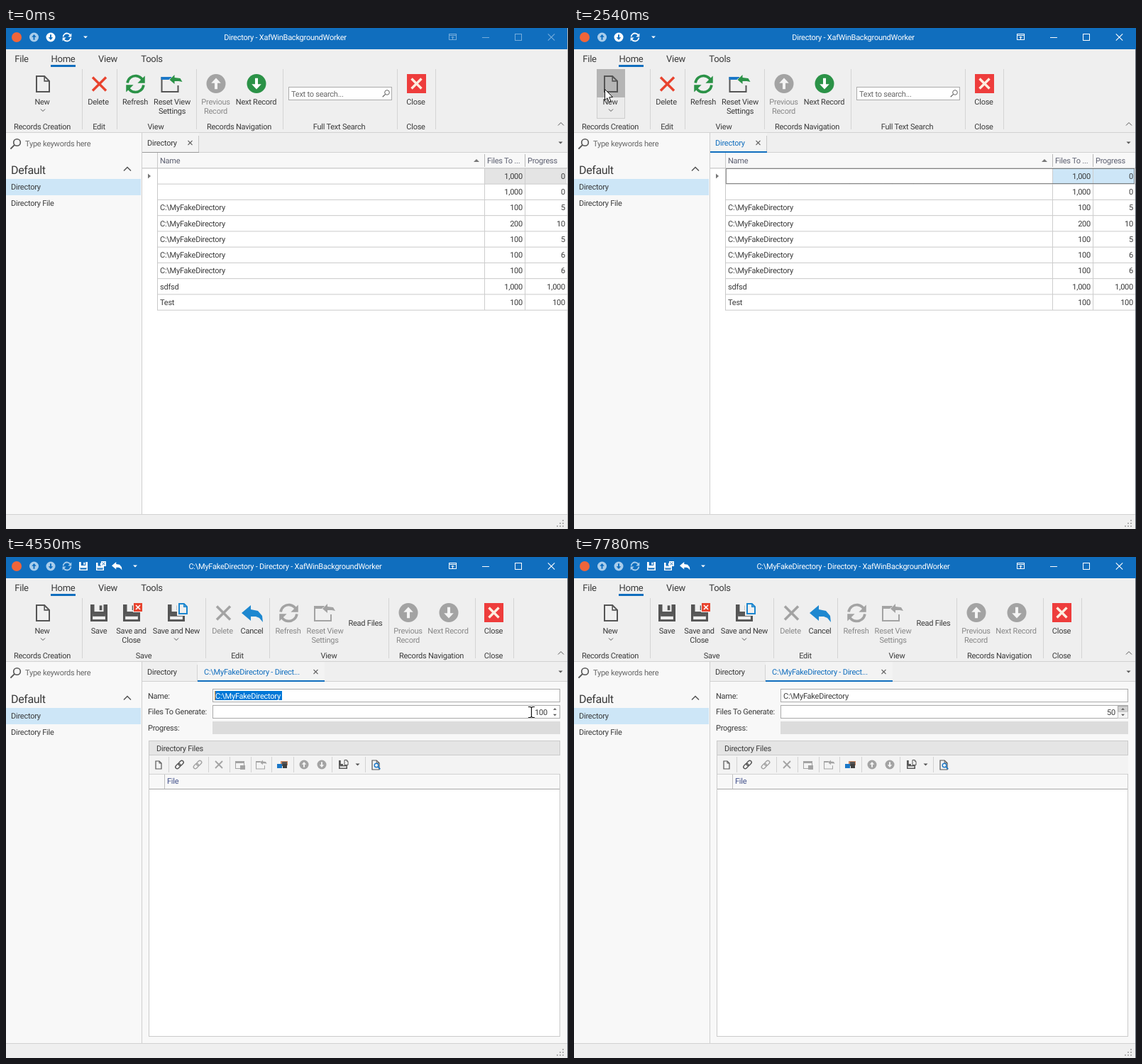
An HTML page with a canvas for the animation above (8000 ms loop, 792 by 707 pixels).

```html
<!DOCTYPE html>
<html lang="en">
<head>
<meta charset="utf-8">
<title>Directory</title>
<style>
html, body { margin: 0; width: 100%; height: 100%; overflow: hidden; }
canvas { display: block; }
</style>
</head>
<body>
<canvas id="c" width="792" height="707"></canvas>
<script>
const g = document.getElementById('c').getContext('2d');
const BLUE = '#106ebe', BAR = '#efefef', LINE = '#d2d2d2', DARK = '#555', GREY = '#a3a3a3',
  RED = '#e8432e', GREEN = '#2b9247', SELECT = '#0078d7', PALE = '#cde6f7', FADED = '#a9cdeb', INK = '#3a3a3a';
const LOOP = 8000, ACTIVE = 1930, DETAIL = 2610, FOCUS = 5150;
g.textRendering = 'geometricPrecision';

// ---- primitives ----
function rect(x, y, w, h, fill, stroke) {
  if (fill) { g.fillStyle = fill; g.fillRect(x, y, w, h); }
  if (stroke) { g.strokeStyle = stroke; g.lineWidth = 1; g.strokeRect(x + .5, y + .5, w - 1, h - 1); }
}
const hline = (x, y, x2, c) => rect(x, y, x2 - x, 1, c);
const vline = (x, y, y2, c) => rect(x, y, 1, y2 - y, c);

function txt(s, x, y, color = INK, align = 'left', size = 11) {
  g.font = size + 'px Roboto, "Noto Sans", sans-serif';
  g.letterSpacing = -size * .022 + 'px';
  g.textAlign = align;
  g.fillStyle = color;
  g.fillText(s, x, Math.round(y + size * .36));
}
function trace(pts, ox = 0, oy = 0, k = 1) {
  g.beginPath();
  for (let i = 0; i < pts.length; i += 2) g.lineTo(ox + pts[i] * k, oy + pts[i + 1] * k);
}
function poly(pts, color, ox, oy, k) {
  trace(pts, ox, oy, k);
  g.fillStyle = color;
  g.fill();
}
function stroke(pts, color, width = 1, ox, oy, k) {
  trace(pts, ox, oy, k);
  g.strokeStyle = color;
  g.lineWidth = width;
  g.stroke();
}
function disc(x, y, r, color) {
  g.beginPath();
  g.arc(x, y, r, 0, 7);
  g.fillStyle = color;
  g.fill();
}
function ring(x, y, r, color, width) {
  g.beginPath();
  g.arc(x, y, r, 0, 7);
  g.strokeStyle = color;
  g.lineWidth = width;
  g.stroke();
}

// ---- icons ----
function cross(x, y, r, color, width) {
  stroke([-r, -r, r, r], color, width, x, y);
  stroke([r, -r, -r, r], color, width, x, y);
}
const drop = (x, y, color = DARK, r = 3) => poly([-r, -r / 2, r, -r / 2, 0, r / 2], color, x, y);
const chevron = (x, y, r, dir, color = DARK, w = 1) => stroke([-r, -dir * r / 2, 0, dir * r / 2, r, -dir * r / 2], color, w, x, y);

function doc(x, y, w, h, color, lw) {
  const f = w * .38;
  stroke([0, 0, w - f, 0, w, f, w, h, 0, h, 0, 0, w - f, 0], color, lw, x, y);
  stroke([w - f, 0, w - f, f, w, f], color, lw * .8, x, y);
}
function arrowDisc(x, y, r, dir, color, ink) {
  disc(x, y, r, color);
  poly([0, .6, .5, .05, .15, .05, .15, -.58, -.15, -.58, -.15, .05, -.5, .05], ink, x, y, r * dir);
}
function refresh(x, y, r, color, width) {
  for (const a of [0, Math.PI]) {
    g.save();
    g.translate(x, y);
    g.rotate(a);
    g.beginPath();
    g.arc(0, 0, r, Math.PI * 1.04, Math.PI * 1.82);
    g.strokeStyle = color;
    g.lineWidth = width;
    g.stroke();
    poly([1.15, -1, 1.15, -.1, .25, -.1], color, 0, 0, r);
    g.restore();
  }
}
function resetView(x, y, k, frame, top, arrow) {
  stroke([14, 3, 1, 3, 1, 23, 24, 23, 24, 14], frame, 2 * k, x, y, k);
  poly([0, 2, 15, 2, 11, 6, 0, 6], top, x, y, k);
  poly([12, 6, 19, -1, 19, 3, 27, 4, 30, 9, 25, 8, 19, 8, 19, 12], arrow, x, y, k);
}
function floppy(x, y, s, color, bg) {
  const part = (a, b, w, h, c) => rect(x + a * s, y + b * s, w * s, h * s, c);
  part(0, 0, 1, 1, color);
  part(.23, 0, .54, .42, bg);
  part(.53, .06, .15, .28, color);
  part(.13, .58, .74, .3, bg);
  part(.13, .58, .74, .12, color);
}
const undo = (x, y, k, color) =>
  poly([0, 11, 13, 0, 13, 6, 23, 8, 29, 15, 30, 24, 25, 18, 20, 16, 13, 16, 13, 22], color, x, y, k);
function lens(x, y, r, color, w, dir) {
  ring(x, y, r, color, w);
  stroke([.7 * dir, .7, 1.9 * dir, 1.9], color, w * 1.2, x, y, r);
}

// ---- ribbon ----
function titleBar(t) {
  const detail = t >= DETAIL, on = t >= ACTIVE ? '#fff' : '#76addc';
  rect(0, 0, 792, 30, BLUE);
  disc(15, 13, 7, '#f0653a');
  arrowDisc(39.5, 13, 6.5, -1, FADED, BLUE);
  arrowDisc(63, 13, 6.5, 1, detail ? FADED : '#fff', BLUE);
  refresh(86, 13, 5.5, detail ? FADED : '#fff', 1.8);
  if (detail) {
    floppy(103, 7, 12, '#fff', BLUE);
    floppy(127, 8, 11, '#fff', BLUE);
    rect(134, 6, 7, 7, '#fff');
    cross(137.5, 9.5, 2, BLUE, 1);
    undo(149, 7, .48, '#fff');
  }
  drop(detail ? 182 : 112, 13, '#fff');
  txt((detail ? 'C:\\MyFakeDirectory - ' : '') + 'Directory - XafWinBackgroundWorker', 393.5, 13, '#fff', 'center');
  rect(624, 8, 11, 9, null, on);
  hline(624, 10, 635, on);
  stroke([629.5, 16, 629.5, 12], on);
  stroke([627.5, 14, 629.5, 12, 631.5, 14], on);
  hline(671, 13, 681, on);
  rect(717, 8, 10, 10, null, on);
  cross(768.5, 13, 4.7, on, 1.1);
}

function ribbon(t) {
  rect(0, 30, 792, 118, BAR);
  [['File', 22], ['Home', 80.5], ['View', 143.5], ['Tools', 205.5]].forEach(([s, x]) => txt(s, x, 43.5, INK, 'center', 13));
  rect(63, 52, 35, 3, BLUE);
  if (t >= 1790 && t < 2930) {
    rect(32, 58, 40, 70, '#ebebeb', '#cdcdcd');
    rect(32, 58, 40, 40, t >= ACTIVE && t < DETAIL ? '#b5b5b5' : '#c6c6c6');
  }
  doc(43, 68, 18, 22, DARK, 2);
  chevron(52, 116, 3, 1);
  hline(0, 147, 792, LINE);
  chevron(782, 135.5, 4, -1);
  (t < DETAIL ? listRibbon : detailRibbon)();
}
function captions(items, color) {
  for (const [s, x, y] of items) txt(s, x, y, color, 'center');
}
const groups = xs => xs.forEach(x => vline(x, 58, 143, '#d4d4d4'));
function closeIcon(x) {
  rect(x - 13, 65, 27, 27, '#ee3d3c');
  cross(x + .5, 78.5, 7, '#fdeee0', 3.4);
}

function listRibbon() {
  groups([107, 156, 268, 390, 551, 605]);
  cross(131.5, 79, 9.5, RED, 3.4);
  refresh(182.5, 79, 11.5, GREEN, 3.6);
  resetView(218.5, 67, 1, DARK, '#1b78c8', GREEN);
  arrowDisc(296, 78.5, 13.5, -1, GREY, '#f4f4f4');
  arrowDisc(353, 78.5, 13.5, 1, GREEN, '#fff');
  rect(398, 83, 146, 19, '#fff', '#ababab');
  txt('Text to search...', 402, 93, '#666');
  lens(537, 91, 3.3, '#666', 1, -1);
  closeIcon(578);
  captions([['New', 51, 104], ['Delete', 130, 104], ['Refresh', 182, 104], ['Reset View', 234, 104], ['Settings', 234, 117],
    ['Next Record', 352.5, 104], ['Close', 577.5, 104], ['Records Creation', 51, 139], ['Edit', 131, 139], ['View', 211, 139],
    ['Records Navigation', 328.5, 139], ['Full Text Search', 469.5, 139], ['Close', 577.5, 139]]);
  captions([['Previous', 295.5, 104], ['Record', 295.5, 117]], '#888');
}

function detailRibbon() {
  groups([107, 281, 371, 539, 661, 715]);
  floppy(119, 67, 24, DARK, BAR);
  floppy(165, 67, 24, DARK, BAR);
  rect(179, 64, 14, 14, BAR);
  rect(180, 65, 12, 12, RED);
  cross(186, 71, 3, '#fff', 1.6);
  floppy(228, 67, 24, DARK, BAR);
  rect(241, 64, 16, 19, BAR);
  doc(244, 66, 11, 14, '#1b86cf', 2);
  cross(306.5, 79, 9.5, GREY, 3.6);
  undo(332, 68, 1, '#1e88d0');
  refresh(398.5, 79, 11.5, GREY, 3.6);
  resetView(434, 67, 1, GREY, GREY, GREY);
  arrowDisc(567, 78.5, 13.5, -1, GREY, '#f4f4f4');
  arrowDisc(624, 78.5, 13.5, 1, GREY, '#f4f4f4');
  closeIcon(687);
  chevron(240, 116, 3, 1);
  captions([['New', 51, 104], ['Save', 131, 104], ['Save and', 176.5, 104], ['Close', 176.5, 117], ['Save and New', 240, 104],
    ['Cancel', 346.5, 104], ['Read Files', 506.5, 93], ['Close', 687, 104], ['Records Creation', 51, 139], ['Save', 194, 139],
    ['Edit', 326, 139], ['View', 455, 139], ['Records Navigation', 599.5, 139], ['Close', 687, 139]]);
  captions([['Delete', 305, 104], ['Refresh', 397.5, 104], ['Reset View', 449.5, 104], ['Settings', 449.5, 117],
    ['Previous', 566.5, 104], ['Record', 566.5, 117], ['Next Record', 623, 104]], '#888');
}

// ---- body ----
function sidebar() {
  rect(0, 148, 191, 538, '#f8f8f8');
  lens(15.5, 161.5, 4.8, DARK, 1.6, -1);
  txt('Type keywords here', 27, 163.5, '#666');
  txt('Default', 7, 200, INK, 'left', 16);
  chevron(171, 199, 5, -1, DARK, 1.5);
  rect(0, 213, 190, 23, PALE);
  txt('Directory', 7, 224.5);
  txt('Directory File', 7, 247.5);
}

function tabStrip(t) {
  rect(191, 148, 601, 28, BAR);
  hline(191, 175, 792, LINE);
  drop(781.5, 162);
  const detail = t >= DETAIL, on = t >= ACTIVE;
  const [x, x2] = detail ? [270, 449] : [192, 272];
  rect(x, 148, x2 - x, 27, '#f3f3f3');
  if (detail) vline(269, 152, 175, LINE);
  else vline(271, 152, 175, '#c8c8c8');
  rect(x, on ? 174 : 175, x2 - x, on ? 2 : 1, on ? BLUE : '#9a9a9a');
  txt('Directory', 199, 162, on && !detail ? BLUE : INK);
  if (detail) txt('C:\\MyFakeDirectory - Direct...', 279, 162, BLUE);
  cross(detail ? 436.5 : 259.5, 162, 3, '#666', 1.1);
}

const fake = 'C:\\MyFakeDirectory';
const rows = [['', '1,000', 0], ['', '1,000', 0], [fake, 100, 5], [fake, 200, 10], [fake, 100, 5],
  [fake, 100, 6], [fake, 100, 6], ['sdfsd', '1,000', '1,000'], ['Test', 100, 100]];

function list(t) {
  const on = t >= ACTIVE, rowY = i => 197.4 + 22.25 * i;
  rect(191, 176, 601, 510, '#fff');
  rect(191, 176, 601, 21, '#f8f8f8');
  txt('Name', 217, 187, '#5c5f70');
  txt('Files To ...', 678, 187, '#5c5f70');
  txt('Progress', 735, 187, '#5c5f70');
  drop(663, 187, '#777', -4);
  rect(674, 198, 116, 22, on ? PALE : '#e4e4e4');
  rows.forEach(([name, files, done], i) => {
    const y = rowY(i) + 11.6;
    txt(name, 217, y);
    txt(files, 728, y, INK, 'right');
    txt(done, 788, y, INK, 'right');
  });
  for (let i = 0; i <= 9; i++) hline(i ? 213 : 191, rowY(i), 791, i ? '#cacaca' : '#b8b8b8');
  vline(213, 176, 398, '#c8c8c8');
  for (const x of [674, 731]) {
    vline(x, 178, 196, '#b8b8b8');
    vline(x, 198, 398, '#cdcdcd');
  }
  poly([0, -3.5, 4, 0, 0, 3.5], '#777', 200, 209);
  if (on) {
    g.setLineDash([1, 1]);
    rect(214, 198, 576, 22, null, '#222');
    g.setLineDash([]);
  }
}

function toolbar() {
  rect(202, 280, 579, 26, '#f3f3f3');
  [229, 285, 315, 345, 374, 405, 459, 506].forEach(x => vline(x, 282, 304, LINE));
  doc(211, 288, 8, 11, DARK, 1.2);
  [[244.5, DARK], [270, GREY]].forEach(([x, c]) => {
    g.save();
    g.translate(x, 293);
    g.rotate(-Math.PI / 4);
    g.strokeStyle = c;
    g.lineWidth = 1.4;
    for (const a of [-7, -1]) {
      g.beginPath();
      g.roundRect(a, -2.5, 8, 5, 2.5);
      g.stroke();
    }
    g.restore();
  });
  cross(300, 293, 5, GREY, 1.8);
  rect(323, 288, 13, 11, null, GREY);
  rect(323, 288, 13, 3, GREY);
  rect(330, 294, 7, 6, GREY);
  resetView(352, 287, .52, GREY, GREY, GREY);
  rect(387, 288, 10, 6, '#d08a64');
  rect(389, 289, 7, 6, DARK);
  rect(382, 292, 7, 6, '#1b78c8');
  rect(390, 292, 6, 6, '#404040');
  arrowDisc(420, 293, 6.5, -1, GREY, '#f4f4f4');
  arrowDisc(445, 293, 6.5, 1, GREY, '#f4f4f4');
  floppy(469, 287, 12, DARK, '#f3f3f3');
  rect(475, 285, 8, 9, '#f3f3f3');
  doc(477, 286.5, 5, 7, DARK, 1);
  drop(495.5, 293);
  doc(516, 287, 10, 13, DARK, 1.2);
  lens(522, 294, 2.8, '#1b78c8', 1.4, 1);
}

function detailView(t) {
  rect(191, 176, 601, 510, '#f8f8f8');
  txt('Name:', 200, 196);
  txt('Files To Generate:', 200, 218.5);
  txt('Progress:', 200, 241);
  rect(291, 186, 490, 19, '#fff', '#ababab');
  rect(291, 209, 490, 19, '#fff', '#ababab');
  rect(291, 232, 490, 18, '#dcdcdc');

  const nameOn = t < FOCUS;
  if (nameOn) rect(294, 189, 95, 13, SELECT);
  txt(fake, 295, 196, nameOn ? '#fff' : INK);
  const blink = t < 2960 || Math.floor((t - 2960) / 530) % 2;
  if (nameOn && blink) vline(294, 189, 202, '#ff8728');

  const count = t < 7580 ? 100 : t < 7720 ? 5 : 50;
  const picked = count == 100 ? Math.max(0, Math.min(1, (t - FOCUS) / 140)) : 0;
  txt(count, 763, 219, INK, 'right');
  if (picked) {
    g.save();
    g.beginPath();
    g.rect(745, 212, 18 * picked, 13);
    g.clip();
    rect(745, 212, 18, 13, SELECT);
    txt(count, 763, 219, '#fff', 'right');
    g.restore();
    if (t > 5650 && Math.floor((t - 5650) / 532) % 2) vline(762, 212, 224, '#ff8728');
  }
  if (t >= 5780) {
    rect(766, 210, 15, 9, '#cfcfcf', '#ababab');
    rect(766, 218, 15, 10, '#f4f4f4', '#c6c6c6');
  }
  drop(773.5, 214.5, DARK, -2.5);
  drop(773.5, 223, DARK, 2.5);

  rect(201, 259, 580, 418, '#fff', '#cbcbcb');
  rect(201, 259, 580, 21, '#e5e5e5', '#cbcbcb');
  txt('Directory Files', 212, 270);
  toolbar();
  rect(202, 306, 578, 21, '#f8f8f8');
  hline(202, 306, 780, LINE);
  hline(202, 327, 780, '#a8a8a8');
  vline(223, 307, 327, '#c0c0c0');
  txt('File', 227, 316.5, '#41508a');
}

function frame(t) {
  vline(191, 148, 686, '#cfcfcf');
  rect(0, 686, 792, 21, BAR);
  hline(0, 686, 792, LINE);
  for (let i = 0; i < 3; i++)
    for (let j = 0; j <= i; j++) rect(784 - j * 4, 694 + i * 4, 2, 2, '#b0b0b0');
  if (t < ACTIVE) vline(791, 0, 707, '#b5b5b5');
  else vline(791, 30, 707, '#5f6670');
}

// ---- pointer: time, x, y ----
const path = [[2890, 43, 86], [3030, 98, 96], [3300, 315, 150], [3650, 584, 213], [3720, 632, 220], [3790, 677, 225],
  [3930, 722, 235], [4150, 740, 224], [4350, 739.5, 222], [4550, 739.5, 219], [5150, 740, 218], [5360, 765, 218],
  [5500, 772, 217], [5640, 780, 216], [5780, 779, 216], [5920, 773, 217]];

function pointerAt(t) {
  if (t < 1720) {
    const left = (1720 - t) / 1060;
    return [43 + 638 * left ** 2, 86 + 612 * left ** 2.6];
  }
  if (t <= path[0][0]) return path[0].slice(1);
  const i = path.findIndex(p => p[0] > t);
  if (i < 0) return path.at(-1).slice(1);
  const [a, b] = [path[i - 1], path[i]], u = (t - a[0]) / (b[0] - a[0]);
  return [1, 2].map(k => a[k] + (b[k] - a[k]) * u);
}

function pointer(t) {
  if (t < 660 || t >= 7620) return;
  const [x, y] = pointerAt(t).map(Math.round);
  const clicking = (t > ACTIVE && t < 2190) || (t > FOCUS && t < 5480);
  if (clicking) disc(x - 1, y + 1, 10, 'rgba(255,232,0,.62)');
  if (t > 3600 && t < 5500) {
    for (const [c, w] of [['rgba(255,255,255,.5)', 2.5], ['#111', 1.2]]) {
      stroke([-4, -7.5, -1, -7.5, .5, -6.5, 2, -7.5, 5, -7.5], c, w, x, y);
      stroke([-4, 7.5, -1, 7.5, .5, 6.5, 2, 7.5, 5, 7.5], c, w, x, y);
      stroke([.5, -7, .5, 7], c, w, x, y);
    }
    return;
  }
  const arrow = [.5, .5, .5, 16, 4, 12.7, 6.5, 18.5, 9, 17.4, 6.6, 11.8, 11.5, 11.5, .5, .5];
  poly(arrow, '#fff', x, y);
  stroke(arrow, '#111', 1, x, y);
}

function draw(now) {
  const t = now % LOOP;
  titleBar(t);
  ribbon(t);
  sidebar();
  tabStrip(t);
  (t < DETAIL ? list : detailView)(t);
  frame(t);
  pointer(t);
  requestAnimationFrame(draw);
}
requestAnimationFrame(draw);
</script>
</body>
</html>
```
